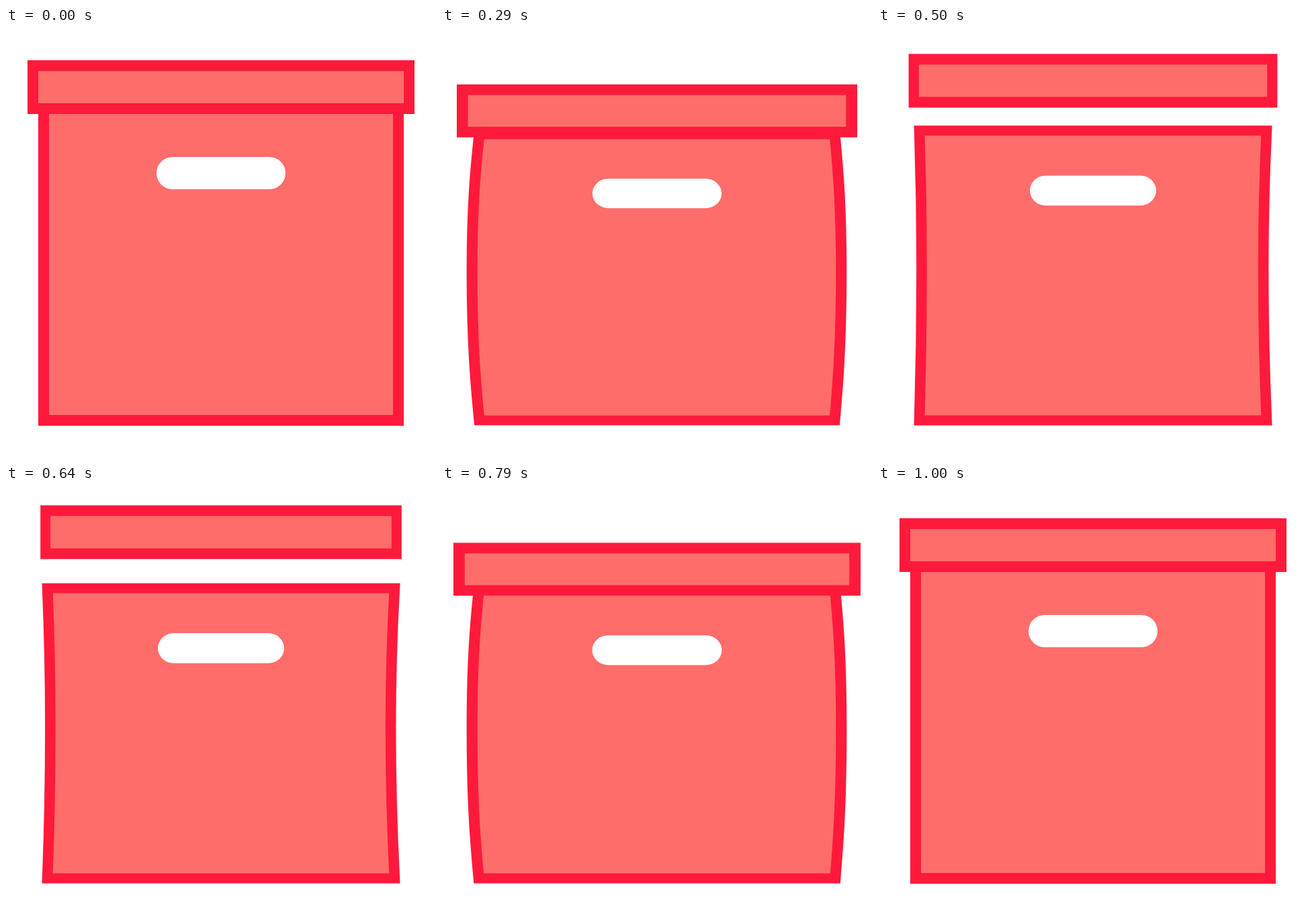
These frames come from a looping animation (640x640 px, 1140 ms). An HTML page with a canvas:

```html
<!DOCTYPE html>
<html lang="en">
<head>
<meta charset="utf-8">
<title>Bouncing box</title>
<style>
  html, body { margin: 0; width: 100%; height: 100%; overflow: hidden; background: #fff; }
  canvas { display: block; width: 640px; height: 640px; }
</style>
</head>
<body>
<canvas id="stage" width="640" height="640"></canvas>
<script>
const ctx = document.getElementById('stage').getContext('2d');
const LOOP = 1140, FPS = 14, LAST = 15;
const LINE = '#ff1a3c', FILL = '#ff6d6b';
const MID = 320, TOP = 120, FLOOR = 584;

const linear = u => u;
const smooth = u => u * u * (3 - 2 * u);
const fall = u => u ** 2.5;
const settle = u => 1 - (1 - u) ** 1.4;

// Body poses: squash, bulge of the sides, their squareness, width
const rest = { squash: 0, bulge: 0, square: 1, width: 1 };
const brace = { squash: 0.042, bulge: 5.6, square: 0.7, width: 1.005 };
const crouch = { squash: 0.109, bulge: 14.3, square: 0, width: 1 };
const stretch = { squash: 0.06, bulge: -8.4, square: 0, width: 0.973 };
const land = { squash: 0.112, bulge: 14.3, square: 0, width: 1.005 };

// Each key: step, pose, easing towards the next key
const bodyKeys = [
  [2, rest, linear], [3, brace, linear], [4.67, crouch, smooth],
  [8, stretch, fall], [10, land, linear], [12, brace, settle], [14, rest]
];

const shut = { drop: 0, spread: 0 };
const lidKeys = [
  [2, shut, linear],
  [5, { drop: 54, spread: 15 }, smooth],
  [8, { drop: -31.7, spread: -23.6 }, fall],
  [10, { drop: 39, spread: 1.2 }, linear],
  [11, { drop: 36.5, spread: 15 }, settle],
  [14, shut]
];

function poseAt(keys, n) {
  const next = keys.findIndex(key => key[0] > n);
  if (next < 0) return keys[keys.length - 1][1];
  if (next === 0) return keys[0][1];
  const [from, a, ease] = keys[next - 1], [to, b] = keys[next];
  const u = ease((n - from) / (to - from)), pose = {};
  for (const name in a) pose[name] = a[name] + (b[name] - a[name]) * u;
  return pose;
}

function scaled(x, y, sx, sy, draw) {
  ctx.save();
  ctx.translate(x, y);
  ctx.scale(sx, sy);
  ctx.translate(-x, -y);
  draw();
  ctx.restore();
}

function paint() {
  ctx.fillStyle = FILL;
  ctx.strokeStyle = LINE;
  ctx.lineWidth = 16;
  ctx.fill();
  ctx.stroke();
}

// One side wall: two curves meeting at the widest point.
function wall(x, from, to, bulge, square) {
  const waist = 342, reach = 1 / 3 + 0.55 * square;
  const out = x + bulge, lead = (1 - square) / 3, near = x + bulge * 2 * lead;
  const a = from - waist, b = to - waist;
  ctx.bezierCurveTo(near, from - a * lead, out, waist + a * reach, out, waist);
  ctx.bezierCurveTo(out, waist + b * reach, near, to - b * lead, x, to);
}

function body({ bulge, square }) {
  const skew = 1.5 * (1 - square);
  ctx.beginPath();
  ctx.moveTo(56, TOP);
  ctx.lineTo(584, TOP);
  wall(584, TOP, FLOOR, bulge - skew, square);
  ctx.lineTo(56, FLOOR);
  wall(56, FLOOR, TOP, -bulge, square);
  ctx.closePath();
  paint();

  ctx.beginPath();
  ctx.roundRect(224, 192, 192, 48, 24);
  ctx.fillStyle = '#fff';
  ctx.fill();
}

function lid() {
  ctx.beginPath();
  ctx.rect(40, 56, 560, 64);
  paint();
}

// Steps start on whole hundredths of a second.
function stepAt(t) {
  let n = LAST;
  while (Math.round(n * 100 / FPS) * 10 > t) n--;
  return n;
}

function render(t) {
  const n = stepAt(t);
  const box = poseAt(bodyKeys, n), top = poseAt(lidKeys, n);
  ctx.fillStyle = '#fff';
  ctx.fillRect(0, 0, 640, 640);
  scaled(MID, FLOOR, box.width, 1 - box.squash, () => body(box));
  ctx.save();
  ctx.translate(0, top.drop);
  scaled(MID, 48, 1 + top.spread / 288, 1 - 0.0004 * Math.max(top.drop, 0), lid);
  ctx.restore();
}

const start = performance.now();
function tick() {
  render((performance.now() - start) % LOOP);
  requestAnimationFrame(tick);
}
tick();
</script>
</body>
</html>
```
